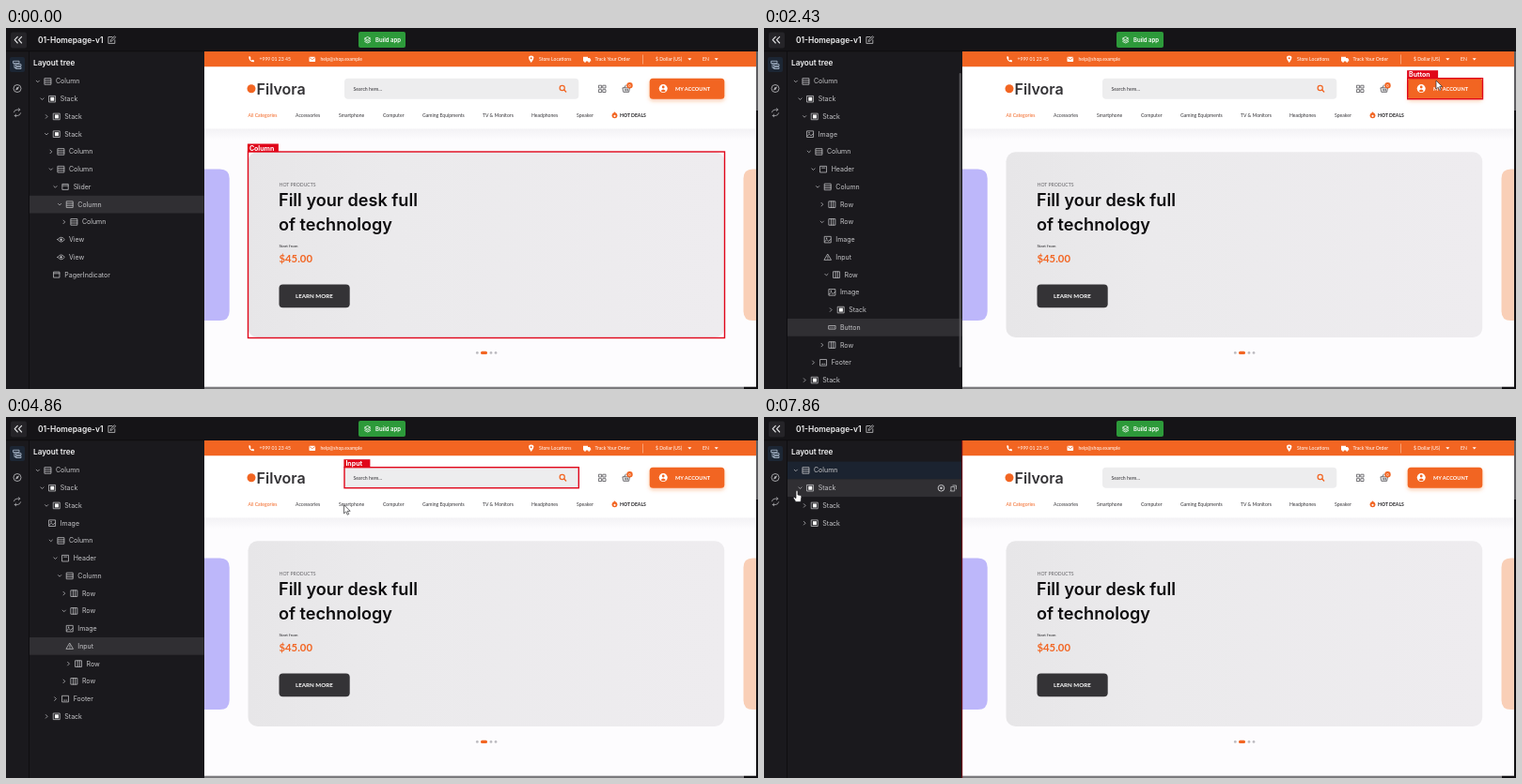
Recreate the animation shown at these times as an HTML page. Size 800x385 px, loop 8 s.

```html
<!DOCTYPE html>
<html lang="en">
<head>
<meta charset="utf-8">
<title>Layout editor</title>
<style>
html, body { margin: 0; width: 100%; height: 100%; overflow: hidden; background: #151417; }
svg { display: block; width: 100vw; height: 100vh; }
.ui { font-family: Inter, sans-serif; }
.shop { font-family: Lato, sans-serif; }
.line { fill: none; stroke-linecap: round; stroke-linejoin: round; }
</style>
</head>
<body>
<svg id="stage" viewBox="0 0 800 385" xmlns="http://www.w3.org/2000/svg"></svg>
<script>
const LOOP = 8000, STEPS_PER_MS = 0.007;
const ORANGE = '#f26522', RED = '#e0061a', PANEL = '#1a191d', LABEL = '#c6c6c9';
const ROW_TOP = 47.6, ROW_HEIGHT = 18.74;

const rect = (x, y, w, h, fill, r = 0, extra = '') =>
  `<rect x="${x}" y="${y}" width="${w}" height="${h}" rx="${r}" fill="${fill}" ${extra}/>`;
const circle = (x, y, r, fill, extra = '') =>
  `<circle cx="${x}" cy="${y}" r="${r}" fill="${fill}" ${extra}/>`;
const line = (d, stroke, width = 0.8) =>
  `<path class="line" d="${d}" stroke="${stroke}" stroke-width="${width}"/>`;
const shape = (d, fill, extra = '') => `<path d="${d}" fill="${fill}" ${extra}/>`;
const text = (x, y, size, fill, label, weight = 400) =>
  `<text x="${x}" y="${y}" font-size="${size}" font-weight="${weight}" fill="${fill}">${label}</text>`;
const at = (x, y, content) => `<g transform="translate(${x} ${y})">${content}</g>`;

// Node icons, centred on the origin
const frame = 'M-3.3-3.3H3.3V3.3H-3.3Z';
const outline = d => line(d, LABEL, 0.75);
const icons = {
  Column: outline(frame + 'M-3.3-1.1H3.3M-3.3 1.1H3.3'),
  Row: outline(frame + 'M-1.1-3.3V3.3M1.1-3.3V3.3'),
  Stack: outline(frame) + rect(-2, -2, 4, 4, '#fff'),
  Slider: outline('M-3-3H3V3H-3ZM-3-1.3H3'),
  Header: outline(frame + 'M-1.6-1.5H1.6'),
  Footer: outline(frame + 'M-1.6 1.5H-.6M.6 1.5H1.6'),
  PagerIndicator: outline('M-3-3H3V3H-3ZM-3-1.3H3'),
  Image: outline(frame + 'M-3.3 2L-1 0L.7 1.6L3.3-.4') + circle(-1.3, -1.4, 0.7, LABEL),
  Input: outline('M0-3L3.6 3H-3.6ZM0-.8V.9M0 2V2'),
  Button: outline('M-3.5-1.8H3.5V1.8H-3.5ZM-1.8 0H-1.7M0 0H.1M1.8 0H1.9'),
  View: outline('M-3.7 0Q0-5 3.7 0Q0 5-3.7 0Z') + circle(0, 0, 1.2, LABEL),
  Text: line('M-2.4-1.9V-2.8H2.4V-1.9M0-2.8V3M-1 3H1', LABEL, 1)
};

// Each node: depth, v open / > closed / - leaf, name
const root = '0vColumn 1vStack ';
const header = root + '2vStack 3-Image 3vColumn 4vHeader 5vColumn 6>Row ';
const footer = ' 6>Row 4>Footer 2>Stack';
const trees = {
  slider: root + '2>Stack 2vStack 3>Column 3vColumn 4vSlider 5vColumn 6>Column 5-View 5-View 4-PagerIndicator',
  button: header + '6vRow 7-Image 7-Input 7vRow 8-Image 8>Stack 8-Button' + footer,
  input: header + '6vRow 7-Image 7-Input 7>Row' + footer,
  row: header + '6>Row 6vRow' + ' 7-Text'.repeat(9),
  closed: '0vColumn 1>Stack',
  open: root + '2>Stack 2>Stack'
};

const scenes = [
  { step: 0, tree: 'slider', active: 7, tag: 'Column', box: [257.5, 132, 507, 198.5], tagWidth: 33 },
  { step: 15, tree: 'button', active: 14, tag: 'Button', box: [684.7, 53.7, 79.8, 22], tagWidth: 33, thumb: 314 },
  { step: 27, tree: 'input', active: 10, tag: 'Input', box: [360, 53.7, 249.3, 22], tagWidth: 28 },
  { step: 36, tree: 'row', active: 9, tag: 'Row', box: [211, 87.7, 587, 19.6], tagWidth: 18.5, thumb: 285 },
  { step: 44, tree: 'closed', active: 0, whole: true },
  { step: 49, tree: 'closed', active: 0, hover: 1, whole: true },
  { step: 54, tree: 'open', active: 0, hover: 1, whole: true }
];

// Pointer stops: step, x, y
const stops = [
  [1, 522, 378], [4, 508, 254], [8, 508, 254], [9, 506, 245], [11, 715, 56], [24, 715, 56],
  [26, 573, 68], [31, 573, 68], [35, 320, 98.5], [38, 320, 98.5], [43, 56, 92],
  [47, 54.5, 85], [51, 35, 78]
];

function drawTree({ tree, active, hover, thumb }) {
  const rows = trees[tree].split(' ').map((node, i) => {
    const [, depth, kind, name] = node.match(/(\d)(.)(\w+)/);
    const y = ROW_TOP + ROW_HEIGHT * (i + 0.5);
    const x = depth * 4.66 - (kind === '-' ? 9.3 : 0);
    const chevron = { v: 'M-1.6-.8L0 .8L1.6-.8', '>': 'M-.8-1.8L1-0L-.8 1.8', '-': '' }[kind];
    let fill = '';
    if (i === hover) fill = '#302f33';
    else if (i === active) fill = hover ? '#1b2330' : '#302f33';
    return (fill && rect(25, y - ROW_HEIGHT / 2, 185.5, ROW_HEIGHT, fill)) +
      (chevron && at(x + 33.8, y, line(chevron, '#b4b4b8'))) +
      at(x + 44.6, y, icons[name]) + text(x + 53, y + 2.5, 7, LABEL, name);
  });
  if (hover) {
    rows.push(at(188.5, 75.8, circle(0, 0, 3.3, 'none', `stroke="${LABEL}"`) + circle(0, 0, 1.3, LABEL)));
    rows.push(at(201.5, 75.8, outline('M-2.6 2.8V-1.4H1.2V2.8ZM-.6-2.8H3V1M-3.4 3.3L-2.6 2.6')));
  }
  if (thumb) rows.push(rect(207.7, 48, 2, thumb, '#57565a', 1));
  return rows.join('');
}

function drawSelection({ box, tag, tagWidth, whole }) {
  if (whole) return rect(210, 25, 1.2, 360, '#650d14');
  const [x, y, w, h] = box;
  return rect(x, y, w, h, 'none', 0, `stroke="${RED}" stroke-width="1.4"`) +
    rect(x - 0.6, y - 8.5, tagWidth, 8.5, RED) + text(x + 1.4, y - 1.4, 7, '#fff', tag, 700);
}

const arrow = shape('M0 0V9.2L2.2 7.2L3.7 10.5L5.2 9.8L3.7 6.6H6.6Z', '#fff',
  'stroke="#2b2b2e" stroke-width=".7" stroke-linejoin="round"');
const hand = shape('M-1 1Q0-.5 1 1V5L4 5.6Q5 6 4.8 7.4L4 12.5H-1.2L-3.6 8.6Q-4 7.2-2.8 7.4L-1 8.7Z', '#fff',
  'stroke="#202024" stroke-width=".7" stroke-linejoin="round"');

function pointer(step) {
  if (step < stops[0][0]) return '';
  const next = stops.findIndex(stop => stop[0] > step);
  let [, x, y] = stops.at(next < 0 ? -1 : next - 1);
  if (next > 0) {
    const [start] = stops[next - 1], [end, toX, toY] = stops[next];
    const p = (step - start) / (end - start), ease = p * p * (3 - 2 * p);
    x += (toX - x) * ease;
    y += (toY - y) * ease;
  }
  return at(x, y, x < 42 ? hand : arrow);
}

function drawChrome() {
  return rect(0, 0, 800, 385, '#151417') + rect(0, 25, 211, 360, PANEL) +
    rect(0, 24.4, 800, 0.8, '#0c0b0e') + rect(24, 25, 0.8, 360, '#0c0b0e') +
    rect(5, 4.5, 17, 17, '#252428', 2) + line('M12.3 9.3L9.2 12.7L12.3 16M16.6 9.3L13.5 12.7L16.6 16', '#e4e4e6', 1.1) +
    text(34, 15.8, 8.4, '#f1f1f2', '01-Homepage-v1', 600) +
    at(112.5, 12.8, line('M.5-3.3H-3.6V3.6H3.3V0M-1.3 1.3L-.9-.4L3-4.1L4.1-3L.4.9Z', '#c9c9cc')) +
    rect(375, 4, 50, 17, '#2d9a3a', 2) +
    at(384.7, 12.5, line('M-3-1.5L0-3L3-1.5L0 0ZM-3 .3L0 1.8L3 .3M-3 2L0 3.5L3 2', '#fff')) +
    text(393, 14.8, 6, '#fff', 'Build app', 600) +
    rect(4, 31, 16, 16, '#1c2634', 2) +
    at(12, 39, line('M-4-3.7H2V-1.3H-4ZM-1-.3H4V1.7H-1ZM-1 2.7H4V4.5H-1ZM-3-1.3V3.6H-1', '#a9b7ca', 0.9)) +
    at(12, 64.5, circle(0, 0, 4, 'none', 'stroke="#b0b0b4" stroke-width=".9"') +
      shape('M2-2L.8.9L-2 2L-.8-.9Z', '#b0b0b4')) +
    at(12, 90.3, line('M-3.6-.5Q-3-3.2 0-3.2H2.8M1.3-4.5L2.8-3.2L1.3-1.8M3.6.5Q3 3.2 0 3.2H-2.8M-1.3 1.8L-2.8 3.2L-1.3 4.5', '#b0b0b4')) +
    text(29, 39.7, 8.2, '#f1f1f2', 'Layout tree', 600);
}

function drawTopBar() {
  const caret = x => shape(`M${x} 32.2h4l-2 2.4Z`, '#fff');
  return rect(211, 25, 587, 16.5, ORANGE) +
    at(261, 33.3, shape('M-2.8-2.8L-1.3-3.1L-.4-1.1L-1.2-.3Q-.6 1 .4 1.4L1.2.5L3.1 1.4L2.8 3Q-2.7 3-2.8-2.8Z', '#fff')) +
    text(269.5, 35, 5.1, '#fff', '+999 01 23 45') +
    rect(322.5, 30.8, 6.6, 5.2, '#fff', 0.7) + line('M322.9 31.6L325.8 33.7L328.7 31.6', ORANGE, 0.7) +
    text(334.5, 35, 5.1, '#fff', 'help@shop.example') +
    shape('M558.7 37Q553.2 29.7 558.7 29.5Q564.2 29.7 558.7 37Z', '#fff') + circle(558.7, 32.2, 1, ORANGE) +
    text(567, 35, 5.1, '#fff', 'Store Locations') +
    shape('M614 30.7H619V32H621L622.2 33.7V35.6H614Z', '#fff') +
    circle(616, 35.8, 1, '#fff') + circle(620.2, 35.8, 1, '#fff') +
    text(626.5, 35, 5.1, '#fff', 'Track Your Order') +
    rect(677.3, 28.5, 0.6, 10, '#fbc9af') +
    text(691, 35, 5.1, '#fff', '$ Dollar (US)') + caret(725.3) +
    text(741, 35, 5.1, '#fff', 'EN') + caret(753.7);
}

function drawShopHeader() {
  const nav = [[308, 'Accessories'], [354, 'Smartphone'], [401, 'Computer'], [443, 'Gaming Equipments'],
    [507, 'TV &amp; Monitors'], [559, 'Headphones'], [607, 'Speaker']];
  return rect(211, 41.5, 587, 66, '#fff') + rect(211, 107.5, 587, 12, 'url(#headerShade)') +
    circle(261, 64.7, 4.5, ORANGE) +
    `<g class="ui">${text(266.6, 70.5, 16, '#333235', 'Filvora', 600)}</g>` +
    rect(360, 53.7, 249.3, 22, '#ededee', 4) + text(369.5, 66.5, 5.2, '#37363a', 'Search here...') +
    circle(591.7, 64, 2.6, 'none', `stroke="${ORANGE}" stroke-width="1.2"`) + line('M593.7 66L595.7 68', ORANGE, 1.3) +
    line('M630.8 61.2h2.8v2.8h-2.8ZM635.2 61.2h2.8v2.8h-2.8ZM630.8 65.7h2.8v2.8h-2.8ZM635.2 65.7h2.8v2.8h-2.8Z', '#555458') +
    line('M656.3 63.8H663.5L662.6 68.3H657.2ZM658 63.6L659.3 61M658.7 65.2V67M660 65.2V67M661.3 65.2V67', '#4b4a4e') +
    circle(663.5, 61.2, 3.2, ORANGE) + text(662.3, 62.6, 4, '#fff', '0', 700) +
    rect(684.7, 53.7, 79.6, 22, ORANGE, 3.5, 'filter="url(#glow)"') +
    circle(699.2, 64.6, 4.5, '#fff') + circle(699.2, 63, 1.4, ORANGE) +
    shape('M696.5 67Q699.2 63.8 701.9 67Q699.2 69.4 696.5 67Z', ORANGE) +
    text(712, 66.6, 5.6, '#fff', 'MY ACCOUNT', 700) +
    text(257.5, 94.9, 5.1, ORANGE, 'All Categories') +
    nav.map(([x, label]) => text(x, 94.9, 5.1, '#37363a', label)).join('') +
    circle(647.5, 93.3, 2.9, ORANGE) + shape('M646.2 91L647.5 89.3L649 91.3Z', ORANGE) + circle(647.5, 93.8, 1.1, '#fff') +
    text(653, 94.9, 5.1, '#232225', 'HOT DEALS', 700);
}

function drawHero() {
  return shape('M211 150.5H227.5Q237.7 150.5 237.7 160.5V302Q237.7 312 227.5 312H211Z', '#bdb7fa') +
    shape('M798 150.5H794.5Q784.5 150.5 784.5 160.5V302Q784.5 312 794.5 312H798Z', '#f9cfb7') +
    rect(257.5, 132.3, 506.7, 197.7, 'url(#hero)', 10) +
    text(290.5, 168.7, 5.1, '#68676b', 'HOT PRODUCTS') +
    `<g class="ui">${text(290, 190.3, 18.1, '#0d0c0e', 'Fill your desk full', 600)}
    ${text(290, 216.3, 18.1, '#0d0c0e', 'of technology', 600)}</g>` +
    text(290.5, 234, 4.5, '#29282b', 'Start from') +
    text(290.5, 250.2, 11.3, ORANGE, '$45.00', 700) +
    rect(290.5, 273.5, 75.2, 24.8, '#343336', 4) + text(308, 288.2, 6.2, '#fff', 'LEARN MORE', 700) +
    circle(501.3, 346.4, 1.4, '#bcbbc0') + rect(505, 344.8, 7, 3.2, ORANGE, 1.5) +
    circle(516, 346.4, 1.4, '#bcbbc0') + circle(521, 346.4, 1.4, '#bcbbc0');
}

const stage = document.getElementById('stage');
stage.innerHTML = `<defs>
  <linearGradient id="hero"><stop stop-color="#e7e6e8"/><stop offset=".3" stop-color="#ebeaec"/><stop offset="1" stop-color="#eeecef"/></linearGradient>
  <linearGradient id="headerShade" x2="0" y2="1"><stop stop-color="#f3f2f5"/><stop offset="1" stop-color="#fdfcfe"/></linearGradient>
  <filter id="glow" x="-20%" y="-40%" width="140%" height="200%">
    <feDropShadow dx="0" dy="2" stdDeviation="2" flood-color="${ORANGE}" flood-opacity=".35"/>
  </filter></defs>
  <g class="ui">${drawChrome()}<g id="tree"></g></g>
  <g class="shop">${rect(211, 25, 587, 358, '#fdfcfe')}${drawTopBar()}${drawShopHeader()}${drawHero()}</g>
  ${rect(798, 25, 2, 63, '#5d5c60')}${rect(798, 88, 2, 297, '#111013')}
  ${rect(211, 382.7, 574, 2.3, '#7b7a7d')}${rect(785, 382.7, 15, 2.3, '#111013')}
  <g id="selection" class="ui"></g><g id="pointer"></g>`;

const [treeLayer, selectionLayer, pointerLayer] =
  ['tree', 'selection', 'pointer'].map(id => document.getElementById(id));
let shownScene, shownStep;

function render(time) {
  const step = Math.floor((time % LOOP + 6) * STEPS_PER_MS);
  if (step !== shownStep) {
    shownStep = step;
    const scene = scenes.findLast(s => s.step <= step);
    if (scene !== shownScene) {
      shownScene = scene;
      treeLayer.innerHTML = drawTree(scene);
      selectionLayer.innerHTML = drawSelection(scene);
    }
    pointerLayer.innerHTML = pointer(step);
  }
}

const start = performance.now();
function tick() {
  render(performance.now() - start);
  requestAnimationFrame(tick);
}
tick();
</script>
</body>
</html>
```
